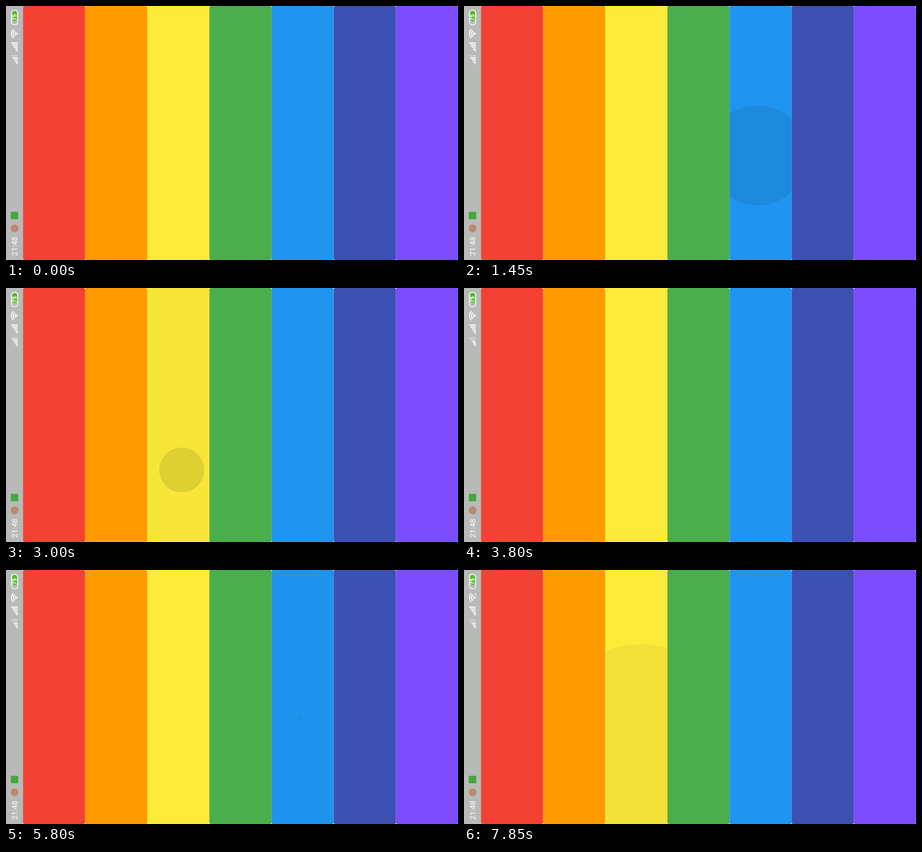
These frames come from a looping animation (998x561 px, 7.9 s). An HTML page:

```html
<!DOCTYPE html>
<html lang="en">
<head>
<meta charset="utf-8">
<title>Rainbow pads</title>
<style>
  html, body { margin: 0; width: 100%; height: 100%; overflow: hidden; background: #fafafa; }
  svg { display: block; width: 100vw; height: 100vh; }
  text { font-family: Roboto, sans-serif; fill: #fff; }
</style>
</head>
<body>
<svg id="stage" viewBox="0 0 998 561" preserveAspectRatio="none">
  <defs><clipPath id="padClip"><rect id="clipRect"/></clipPath></defs>
  <rect id="bar" width="37.6" height="561"/>
  <g id="pads"></g>
  <g clip-path="url(#padClip)">
    <rect id="glow" width="998" height="561"/>
    <circle id="splash"/>
  </g>

  <rect x="14" y="11" width="10" height="22" rx="4" fill="#4fc01c"/>
  <rect x="12" y="9.3" width="14" height="32.4" rx="6.5" fill="none" stroke="#fff" stroke-width="1.7"/>
  <text transform="translate(23.3 32.4) rotate(-90)" font-size="12.5" font-weight="700">75</text>

  <g id="wifi" fill="none" stroke="#fff" stroke-width="2.2"></g>
  <path id="arrows" d="M23 53.2h4l-2 -3zM24 54h4l-2 2.6z" fill="#fff"/>
  <g id="signalA" fill="#fff"></g>
  <g id="signalB" fill="#fff"></g>

  <rect x="10.5" y="454.5" width="16.5" height="16.5" rx="2" fill="#42a93a"/>
  <circle cx="19" cy="491" r="8.7" fill="#b98a70"/>
  <text transform="translate(25 551.7) rotate(-90)" font-size="17">21:48</text>
</svg>
<script>
const LOOP = 7900, STEP = 50;
const LEFT = 37.5, PAD = 137.2, H = 561;
const SPEED = 1.56;      // splash growth after release, px per ms
const FADE = 200;
const SPLASH = 0.115, GLOW = 0.16;
const COLORS = ['#f34234', '#ff9a00', '#fceb39', '#4aae4d', '#1f95f0', '#3c50b2', '#7b4dff'];
const YELLOW = 2, BLUE = 4;

// start, how long the finger stays down, pad, x, y
const TAPS = [
  [540, 50, YELLOW, 386, 396],
  [1340, 50, BLUE, 648, 330],
  [2295, 40, YELLOW, 397, 407],
  [2935, 45, YELLOW, 388, 402],
  [3390, 50, BLUE, 650, 330],
  [4540, 50, YELLOW, 388, 398],
  [5167, 40, YELLOW, 380.5, 389.5],
  [5793, 80, BLUE, 647, 327],
  [7668, 50, YELLOW, 392, 390]
];

const $ = id => document.getElementById(id);

function set(el, attrs) {
  for (const k in attrs) el.setAttribute(k, attrs[k]);
  return el;
}

function add(parent, tag, attrs) {
  const el = document.createElementNS('http://www.w3.org/2000/svg', tag);
  return parent.appendChild(set(el, attrs));
}

const padBox = i => ({ x: LEFT + i * PAD, y: 0, width: PAD, height: H, rx: 3.5 });

function drawSignal(group, top) {
  const bars = [];
  for (let i = 0; i < 4; i++) {
    const x = 11.3 + i * 2.9;
    bars.push(add(group, 'rect', { x, y: top + i * 4.35, width: 26 - x, height: 2.6 }));
  }
  add(group, 'path', { d: `M26 ${top + 16.6}v4.4l-4.2 -4.4z` });
  return bars;
}

function drawWifi() {
  for (const r of [5, 9.3, 13.7]) {
    const c = r * 0.72, dx = r * 0.694;
    add($('wifi'), 'path', { d: `M${26 - dx} ${61 - c}A${r} ${r} 0 0 0 ${26 - dx} ${61 + c}` });
  }
  add($('wifi'), 'circle', { cx: 25, cy: 61, r: 1.7, fill: '#fff', stroke: 'none' });
}

COLORS.forEach((fill, i) => add($('pads'), 'rect', { ...padBox(i), fill }));
drawWifi();
drawSignal($('signalA'), 80.7);
const weak = drawSignal($('signalB'), 108.8);
weak[0].setAttribute('opacity', 0.4);

function drawTap(t) {
  const tap = TAPS.find(([start, hold]) => t >= start && t < start + hold + FADE);
  let r = 0, splash = 0, glow = 0;
  if (tap) {
    const [start, hold, pad, x, y] = tap;
    const box = padBox(pad);
    const reach = Math.hypot(Math.max(x - box.x, box.x + PAD - x), Math.max(y, H - y));
    const age = t - start, down = Math.min(age, hold), out = age - down;
    r = Math.min(reach, reach * down / 1000 + SPEED * out);
    splash = SPLASH * (1 - out / FADE);
    glow = GLOW * Math.max(0, down - out) / FADE;
    set($('clipRect'), box);
    set($('splash'), { cx: x, cy: y });
  }
  set($('splash'), { r, opacity: splash });
  set($('glow'), { opacity: glow });
}

function draw(time) {
  const t = Math.floor((time % LOOP) / STEP) * STEP;
  drawTap(t);
  set($('bar'), { fill: t < 950 ? '#b9b8bb' : '#b8bab7' });
  set(weak[1], { opacity: t < 3800 ? 1 : 0.4 });
  set($('arrows'), { opacity: t < 7500 ? 0 : 0.9 });
}

const begin = performance.now();
function tick() {
  draw(performance.now() - begin);
  requestAnimationFrame(tick);
}
tick();
</script>
</body>
</html>
```
